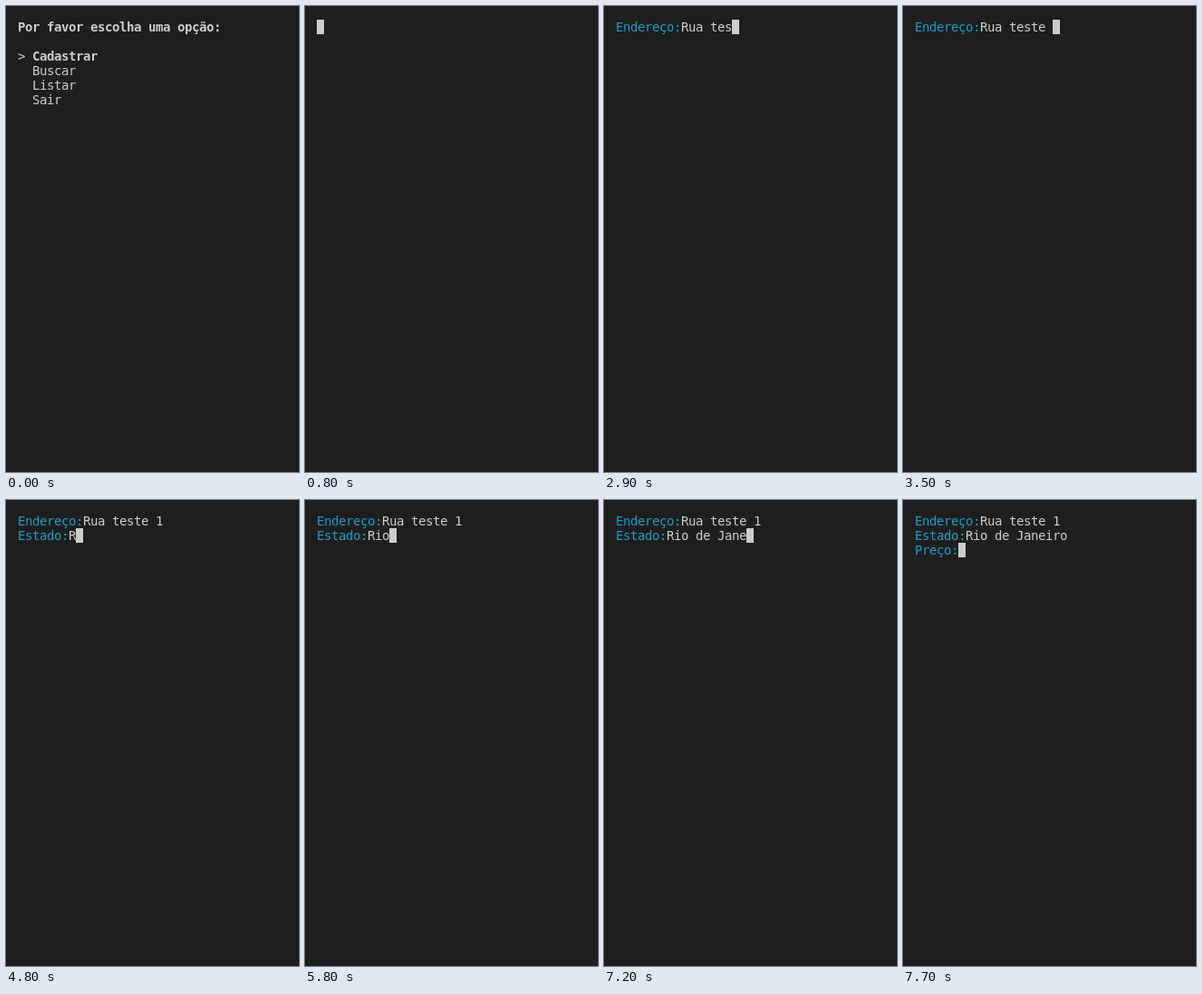
An HTML page with a canvas that plays this animation: 323x512 px, repeating every 8 s.

```html
<!DOCTYPE html>
<html lang="pt-BR">
<head>
<meta charset="utf-8">
<title>Cadastro no terminal</title>
<style>
  html, body { margin: 0; width: 323px; height: 512px; overflow: hidden; background: #1e1e1e; }
  canvas { display: block; }
</style>
</head>
<body>
<canvas id="terminal" width="323" height="512"></canvas>
<script>
const ctx = document.getElementById('terminal').getContext('2d');
const LOOP = 8000, TICK = 100, MENU_END = 800;
const LEFT = 13, TOP = 15, CELL_W = 8, CELL_H = 16, BASELINE = 13;
const TEXT = '#cccccc', LABEL = '#1a9cc8';

const menu = ['Cadastrar', 'Buscar', 'Listar', 'Sair'];

// Each word is one burst of evenly spaced keys between its first and last press.
const word = (text, first, last) => ({ text, first, last });
const fields = [
  { label: 'Endereço:', start: 1000,
    words: [word('Rua', 1800, 2300), word(' teste', 2600, 3100), word(' 1', 3500, 3900)] },
  { label: 'Estado:', start: 3900,
    words: [word('Rio', 4800, 5800), word(' de', 6000, 6300), word(' Janeiro', 6700, 7500)] },
  { label: 'Preço:', start: 7700, words: [] }
];

function typed({ text, first, last }, t) {
  const gap = (last - first) / (text.length - 1);
  return [...text].filter((ch, i) => t >= Math.round((first + i * gap) / TICK) * TICK).join('');
}

// Every character sits in its own terminal cell.
function write(text, col, row, color = TEXT, weight = 'normal') {
  ctx.font = `${weight} 14px "DejaVu Sans Mono", monospace`;
  ctx.fillStyle = color;
  [...text].forEach((ch, i) =>
    ctx.fillText(ch, LEFT + (col + i) * CELL_W, TOP + row * CELL_H + BASELINE));
}

function drawCursor(col, row) {
  ctx.fillStyle = TEXT;
  ctx.fillRect(LEFT + col * CELL_W, TOP + row * CELL_H, CELL_W, CELL_H);
}

function drawMenu() {
  write('Por favor escolha uma opção:', 0, 0, TEXT, 'bold');
  write('>', 0, 2);
  menu.forEach((item, i) => write(item, 2, 2 + i, TEXT, i ? 'normal' : 'bold'));
}

function drawForm(t) {
  const open = fields.filter(field => t >= field.start);
  let cursor = [0, 0];
  open.forEach(({ label, words }, row) => {
    const value = words.map(w => typed(w, t)).join('');
    write(label, 0, row, LABEL);
    write(value, label.length, row);
    cursor = [label.length + value.length, row];
  });
  drawCursor(...cursor);
}

function render() {
  const t = performance.now() % LOOP;
  ctx.fillStyle = '#1e1e1e';
  ctx.fillRect(0, 0, 323, 512);
  if (t < MENU_END) drawMenu();
  else drawForm(t);
  requestAnimationFrame(render);
}
render();
</script>
</body>
</html>
```
